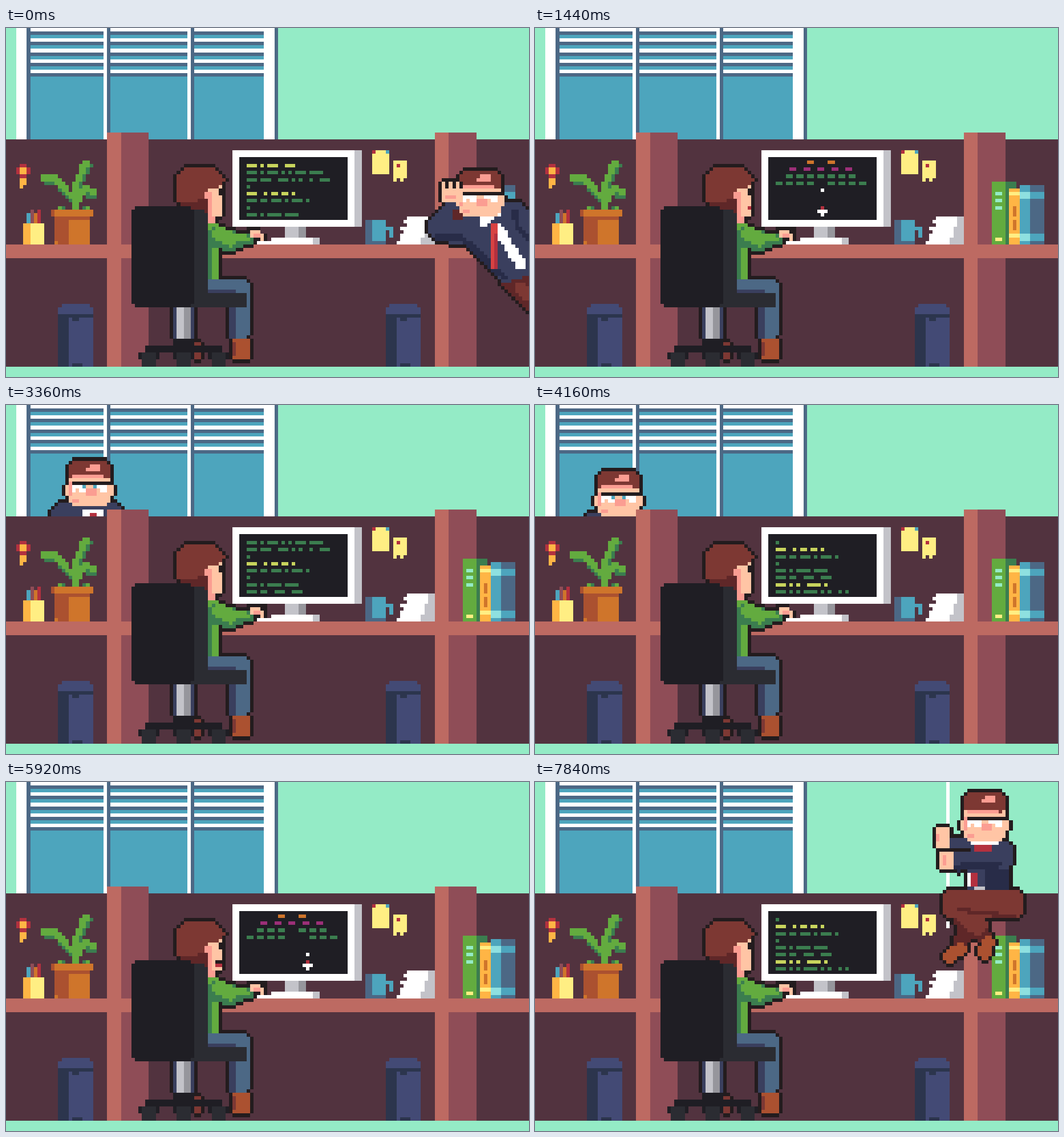
An HTML page with a canvas that plays this animation: 917x611 px, repeating every 8000 ms.

```html
<!DOCTYPE html>
<html lang="en">
<head>
<meta charset="utf-8">
<title>Office hours</title>
<style>
html, body { margin: 0; width: 100%; height: 100%; overflow: hidden; background: #94ebc6; }
canvas { display: block; width: 100vw; height: 100vh; }
</style>
</head>
<body>
<canvas id="stage" width="917" height="611"></canvas>
<script>
const W = 150, H = 100, STEP = 160, STEPS = 50;
const MINT = '#94ebc6', WHITE = '#ffffff', TEAL = '#4da5bd', SLATE = '#4c6885', WALL = '#52333f',
  POST = '#8f4d57', SHELF = '#bd6a62', INK = '#231c1e', BLACK = '#1f1e24', COAL = '#2b2c32',
  GREY = '#c3c3c9', MID = '#96969c', YELLOW = '#ffee83', AMBER = '#ffb545', ORANGE = '#cf752b',
  RUST = '#ab5130', HAIR = '#7d3833', MAROON = '#5f2728', SKIN = '#ffc5a5', PINK = '#fb9d92',
  RED = '#b3313f', LIME = '#63ab3f', GREEN = '#3b7d4f', NAVY = '#3a3f5e', NIGHT = '#282c48',
  STEEL = '#434a75', CODE = '#c8d45d', AQUA = '#8ee0e0', VIOLET = '#9c2f78';

let pen;

function box(color, x, y, w, h) {
  pen.fillStyle = color;
  pen.fillRect(x, y, w, h);
}

// hard-edged fill: test() sees the centre of each cell
function shape(color, test) {
  for (let y = 0; y < H; y++)
    for (let x = 0; x < W; x++)
      if (test(x + 0.5, y + 0.5)) box(color, x, y, 1, 1);
}

// rounded rectangle
function blob(color, x, y, w, h, r) {
  shape(color, (px, py) => {
    const dx = Math.abs(px - x - w / 2) - w / 2 + r, dy = Math.abs(py - y - h / 2) - h / 2 + r;
    return Math.hypot(Math.max(dx, 0), Math.max(dy, 0)) <= r;
  });
}

// thick line through a few points
function limb(color, r, ...points) {
  for (let i = 0; i + 3 < points.length; i += 2) {
    const [ax, ay, bx, by] = points.slice(i, i + 4), vx = bx - ax, vy = by - ay;
    shape(color, (x, y) => {
      const t = Math.max(0, Math.min(1, ((x - ax) * vx + (y - ay) * vy) / (vx * vx + vy * vy)));
      return Math.hypot(x - ax - t * vx, y - ay - t * vy) <= r;
    });
  }
}

// convex polygon, corners in clockwise order
function poly(color, ...p) {
  const corners = p.length / 2;
  shape(color, (x, y) => {
    for (let i = 0; i < corners; i++) {
      const j = (i + 1) % corners;
      const cross = (p[2 * j] - p[2 * i]) * (y - p[2 * i + 1]) - (p[2 * j + 1] - p[2 * i + 1]) * (x - p[2 * i]);
      if (cross < 0) return false;
    }
    return true;
  });
}

function layer(draw) {
  const canvas = document.createElement('canvas');
  canvas.width = W;
  canvas.height = H;
  const previous = pen;
  pen = canvas.getContext('2d');
  draw();
  pen = previous;
  return canvas;
}

function outlined(draw) {
  const body = layer(draw);
  const shade = layer(() => {
    pen.drawImage(body, 0, 0);
    pen.globalCompositeOperation = 'source-in';
    box(INK, 0, 0, W, H);
  });
  return layer(() => {
    for (const d of [-1, 1]) {
      pen.drawImage(shade, d, 0);
      pen.drawImage(shade, 0, d);
    }
    pen.drawImage(body, 0, 0);
  });
}

const sky = layer(() => {
  box(MINT, 0, 0, W, H);
  box(WHITE, 3, 0, 74, 32);
  box(SLATE, 77, 0, 1, 32);
  for (const [left, width] of [[7, 21], [30, 22], [54, 20]]) {
    box(SLATE, left - 1, 0, 1, 32);
    box(TEAL, left, 0, width, 32);
    for (let y = 0; y < 13; y += 3) {
      box(WHITE, left, y, width, 1);
      box(SLATE, left, y + 1, width, 1);
    }
  }
});

function bin(x) {
  const dark = '#2c354d';
  blob(STEEL, x, 79, 10, 12, 3);
  box(STEEL, x, 82, 10, 15);
  box(dark, x, 82, 3, 15);
  box(dark, x, 82, 10, 1);
  box(dark, x + 4, 83, 2, 1);
  box(dark, x + 4, 96, 3, 1);
}

function plant() {
  const leaves = [[11, 43, 14, 43, 18.5, 48], [20.5, 50, 22.5, 46, 25.5, 47], [19.5, 52, 20, 45, 23, 38.5]];
  for (const [color, drop] of [[GREEN, 1], [LIME, 0]]) {
    leaves.forEach((leaf, i) => limb(color, 1, ...leaf.map((v, k) => v + (k % 2 ? drop : drop * (i === 1 ? -0.5 : 0.5)))));
    box(color, 15 + drop, 51, 1, 1);
    box(color, 23 - drop, 51, 1, 1);
  }
  box(ORANGE, 13, 52, 12, 2);
  box(RUST, 13, 52, 1, 2);
  blob(ORANGE, 14, 53, 10, 9, 1.4);
  box(RUST, 14, 54, 4, 7);
  box(RUST, 15, 61, 3, 1);
  box(RUST, 18, 54, 6, 1);
}

function books() {
  box(GREEN, 135, 44, 3, 18);
  box(LIME, 131, 44, 4, 18);
  for (let y = 47; y < 53; y += 2) box(MINT, 132, y, 2, 1);
  box(YELLOW, 132, 60, 2, 1);
  box(AMBER, 136, 46, 3, 16);
  box(TEAL, 139, 45, 3, 17);
  box(SLATE, 142, 45, 4, 17);
  for (const y of [47, 59]) {
    box(YELLOW, 136, y, 3, 1);
    box(AQUA, 139, y, 3, 2);
    box(TEAL, 142, y, 4, 2);
  }
  for (const y of [51, 55]) box(ORANGE, 137, y, 1, 3);
}

function monitor() {
  box(GREY, 65, 35, 37, 22);
  box(WHITE, 65, 35, 35, 22);
  box(BLACK, 67, 37, 31, 18);
  box(GREY, 80, 57, 6, 3);
  box(MID, 84, 57, 2, 3);
  box(GREY, 76, 60, 14, 2);
  box(WHITE, 71, 61, 17, 1);
  box(WHITE, 76, 60, 12, 1);
}

function deskItems() {
  // wall flower
  box(AMBER, 4, 43, 2, 2);
  box(AMBER, 4, 45, 1, 1);
  box(RED, 3, 40, 4, 2);
  box(RED, 4, 39, 2, 4);
  box(AMBER, 4, 40, 2, 2);
  // pencils
  [TEAL, POST, ORANGE, RED].forEach((color, i) => box(color, 6 + i, 53 - i % 2, 1, 4));
  box(YELLOW, 5, 56, 6, 6);
  box(AMBER, 5, 56, 2, 6);
  // sticky notes
  box(YELLOW, 105, 35, 5, 7);
  box(RED, 105, 35, 1, 1);
  box(TEAL, 109, 35, 1, 1);
  box(YELLOW, 111, 38, 4, 5);
  box(RED, 112, 39, 1, 1);
  for (const x of [111, 113]) box(YELLOW, x, 43, 1, 1);
  // mug
  box(TEAL, 108, 57, 3, 3);
  box(WALL, 109, 58, 1, 2);
  box(SLATE, 103, 55, 6, 7);
  box(TEAL, 105, 55, 4, 6);
  // papers
  box(GREY, 115, 54, 8, 8);
  for (let i = 0; i < 8; i++) box(WHITE, 115 - i % 2 - Math.floor(i / 3), 54 + i, 6 + i % 2, 1);
}

const room = layer(() => {
  box(WALL, 0, 32, W, 65);
  for (const x of [29, 123]) {
    box(SHELF, x, 30, 4, 67);
    box(POST, x + 4, 30, 8, 67);
    bin(x - 14);
  }
  box(SHELF, 0, 62, W, 4);
  plant();
  books();
  monitor();
  deskItems();
  box(MINT, 0, 97, W, 3);
});

const coder = outlined(() => {
  // legs
  box(NAVY, 48, 79, 6, 10);
  box(HAIR, 54, 90, 2, 5);
  limb(SLATE, 3.2, 58, 75.2, 66.8, 75.2, 66.8, 86.5);
  box(NAVY, 58, 75, 8, 1);
  box(NAVY, 64, 79, 2, 10);
  blob(RUST, 65, 89, 5, 6, 1.6);
  box(HAIR, 65, 90, 1, 4);
  // torso and sleeve
  box(LIME, 58, 56, 3, 16);
  box(GREEN, 58, 58, 1, 14);
  limb(GREEN, 3, 60.5, 60, 64.5, 61);
  limb(GREEN, 1.6, 66, 61.4, 69.5, 60.6);
  limb(LIME, 2, 61, 59, 64.5, 60.5);
  limb(LIME, 1, 65, 60.5, 69, 60.4);
  // head
  blob(HAIR, 49, 40, 13, 12, 4);
  box(HAIR, 60, 43, 3, 1);
  limb(MAROON, 1, 51, 51, 55, 51, 57.5, 49, 57.5, 53);
  blob(SKIN, 58, 46, 4, 8, 1);
  box(SKIN, 61, 45, 1, 2);
  box(PINK, 57, 47, 2, 2);
  box(PINK, 58, 49, 1, 7);
  box(PINK, 59, 54, 1, 2);
  box(INK, 61, 46, 1, 2);
});

const chair = layer(() => {
  blob(COAL, 50, 52, 8, 28, 3);
  blob(COAL, 50, 76, 19, 4, 1.4);
  blob(BLACK, 36, 51, 18, 29, 2.6);
  box(GREY, 49, 80, 4, 9);
  box(MID, 51, 80, 2, 9);
  box(BLACK, 48, 89, 6, 5);
  box(BLACK, 40, 91, 22, 2);
  for (const x of [38, 48, 58]) {
    box(BLACK, x, 93, 6, 2);
    blob(COAL, x + 1, 93, 4, 4, 1.4);
  }
});

function bossHead(dx, dy, nod = 0) {
  pen.save();
  pen.translate(dx, dy);
  blob(SKIN, 18, 17, 12, 12 + nod, 2);
  blob(HAIR, 18, 16, 12, 6, 2.4);
  box(PINK, 24, 17, 3, 1);
  box(PINK, 23, 18, 4, 1);
  pen.translate(0, nod);
  box(SKIN, 17, 23, 14, 3);
  box(PINK, 19, 20, 9, 1);
  box(SKIN, 19, 21, 10, 1);
  box(INK, 19, 22, 11, 1);
  for (const x of [19, 25]) {
    box(WHITE, x, 23, 4, 2);
    box(SKIN, x + 1, 24, 1, 1);
  }
  box(PINK, 18, 22, 1, 4);
  box(PINK, 23, 24, 3, 2);
  box(PINK, 19, 27, 2, 1);
  pen.restore();
}

const bossPeeking = outlined(() => {
  blob(NAVY, 13, 28, 21, 20, 3.4);
  box(WHITE, 22, 30, 6, 9);
  box(RED, 24, 31, 2, 8);
  bossHead(0, 0);
  for (const x of [22, 25]) box(TEAL, x, 23, 1, 1);
});

const bossLeaning = outlined(() => {
  poly(MAROON, 142, 73, 150, 69, 150, 82);
  limb(HAIR, 1.5, 147, 74, 150, 77);
  poly(NAVY, 130, 55, 142, 50, 147, 50, 150, 52, 150, 71, 143, 73, 131, 62);
  limb(NAVY, 3.9, 127.5, 54, 125, 57, 134, 59);
  limb(NIGHT, 1, 124, 60, 131, 60.5, 143, 71.5);
  limb(NIGHT, 0.8, 146, 53, 146.5, 57, 150, 60);
  limb(WHITE, 1.5, 141.5, 58, 147.5, 67.5);
  limb(WHITE, 1.2, 137, 55.5, 141, 52.5);
  box('#d84242', 139, 56, 2, 13);
  box(RED, 140, 59, 1, 10);
  box(MAROON, 128, 52, 3, 3);
  bossHead(112, 25);
  blob(SKIN, 125, 45, 6, 5, 1);
  for (const x of [125, 127, 129]) {
    box(SKIN, x, 44, 1, 2);
    box(INK, x + 1, 44, 1, 2);
  }
  box(PINK, 126, 48, 3, 1);
});

const bossHanging = outlined(() => {
  // crossed legs and shoes
  limb(MAROON, 2.3, 125, 40, 122, 46);
  limb(MAROON, 2.4, 122, 39, 128.5, 44);
  blob(HAIR, 117, 31, 23, 8, 3);
  limb(HAIR, 2.8, 120.5, 35, 127, 41);
  limb(MAROON, 0.6, 122, 36.5, 127, 37.5, 137, 38.5);
  limb(RUST, 1.8, 122.2, 48, 118.6, 50);
  limb(RUST, 1.9, 130, 46, 128.8, 49);
  // jacket
  blob(NAVY, 122, 17, 15, 8, 2);
  box(NAVY, 124, 22, 12, 9);
  box(NIGHT, 129, 25, 7, 6);
  box(RED, 125, 26, 2, 4);
  box(WHITE, 124, 26, 1, 4);
  box(GREY, 126, 30, 3, 1);
  // arms
  limb(NAVY, 1.8, 120.5, 17.5, 124, 17.5);
  box(INK, 119, 19, 6, 1);
  limb(NAVY, 2.5, 121, 22.8, 133, 21.5);
  limb(NIGHT, 1, 121, 24.6, 133, 23.6);
  blob(SKIN, 115, 13, 4, 6, 1.2);
  blob(SKIN, 116, 20, 4, 5, 1.2);
  box(PINK, 115, 15, 1, 2);
  box(PINK, 117, 21, 1, 3);
  bossHead(105, -13, 1);
  box(WHITE, 125, 17, 8, 1);
  box(RED, 126, 18, 5, 2);
});

const random = seed => {
  const wave = Math.sin(seed * 127.1) * 43758.5453;
  return wave - Math.floor(wave);
};

function codeLine(row, y, limit) {
  const yellow = row === 0 || row % 5 === 4, brace = row % 3 === 0 && !yellow;
  const end = Math.min(limit, brace ? 3 : yellow ? 15 : 14 + 10 * random(row + 1));
  for (let x = 0, i = 0; x < end; i++) {
    const width = brace ? 1 : i ? 1 + Math.floor(4 * random(row * 9 + i) ** 2) : 3;
    box(yellow ? CODE : GREEN, 69 + x, y, Math.min(width, 24 - x), 1);
    x += width + 1 + Math.floor(1.6 * random(row * 5 + i));
  }
}

function codeScreen(typed) {
  const total = Math.min(typed, 11), first = Math.max(0, Math.ceil(total) - 8);
  for (let row = first; row < total; row++) codeLine(row, 39 + 2 * (row - first), 24 * Math.min(1, total - row));
}

function gameScreen(age) {
  const kills = Math.floor(age / 2);
  const bricks = (color, y, from, count, gap) => {
    for (let i = 0; i < count; i++) {
      const x = from + i * gap, order = (x - 81) / 3 * 2 + (y === 42 ? 1 : 0);
      const dead = color === GREEN && x >= 81 && order < kills;
      if (!dead) box(color, x, y, 2, 1);
    }
  };
  bricks(ORANGE, 38, 78, 2, 6);
  bricks(VIOLET, 40, 73, 5, 4);
  bricks(GREEN, 42, 72, 7, 3);
  bricks(GREEN, 44, 69, 9, 3);
  const ship = 82 + Math.max(0, Math.min(6, age - 3));
  box(WHITE, ship, age % 2 ? 49 : 46, 1, 1);
  box(RED, ship, 51, 1, 1);
  box(WHITE, ship - 1, 52, 3, 1);
  box(WHITE, ship, 53, 1, 1);
}

function hand(raised) {
  limb(INK, 1, 70, 58, raised ? 72 : 74, 58);
  box(INK, 72, 59, 3, 2);
  box(SKIN, 70, 58, 3, 2);
  box(SKIN, 72, 59, 2, 1);
  box(SKIN, 73, 60, 1, 1);
  box(PINK, 71, 59, 2, 1);
}

function mouth(open) {
  if (open) box(INK, 60, 51, 2, 1);
  box(RED, open ? 60 : 61, open ? 52 : 51, open ? 2 : 1, 1);
}

// steps at which each round of play begins and at which the screen is cleared
const GAMES = [[7, 17], [30, 43]];

function render(step) {
  const put = (image, x, y) => pen.drawImage(image, Math.round(x), Math.round(y));
  const settle = (distance, age) => Math.floor(distance * 0.55 ** age);
  put(sky, 0, 0);
  if (step >= 15 && step < 30) put(bossPeeking, 0, step < 24 ? settle(17, step - 15) : 0.8 * (step - 24) ** 2);
  put(room, 0, 0);

  const game = GAMES.find(([from, to]) => step >= from && step < to);
  const age = step - (game ? game[0] : step < 7 ? 0 : step < 30 ? 17 : 43);
  if (game) gameScreen(age);
  else codeScreen(step < 7 ? 8 + 0.65 * age : Math.min(2.5 * age, age + 5));

  put(coder, 0, 0);
  put(chair, 0, 0);
  hand(step % 2 === 0);
  if (game || age === 0 && step > 0) mouth(game && age >= 6 && age <= 9);

  if (step < 5) put(bossLeaning, 1.9 * step * step, -3 * step);
  if (step >= 42) {
    const lift = settle(27, step - 43);
    box(WHITE, 118, 0, 1, Math.max(0, 42 - lift));
    put(bossHanging, 0, -lift);
  }
}

const stage = document.getElementById('stage').getContext('2d');
stage.imageSmoothingEnabled = false;

function tick() {
  const step = Math.floor(performance.now() / STEP) % STEPS;
  // the small shift settles how cell edges round to whole pixels
  stage.drawImage(layer(() => render(step)), -0.25, -0.25, 917.3, 611.3);
  requestAnimationFrame(tick);
}
tick();
</script>
</body>
</html>
```
